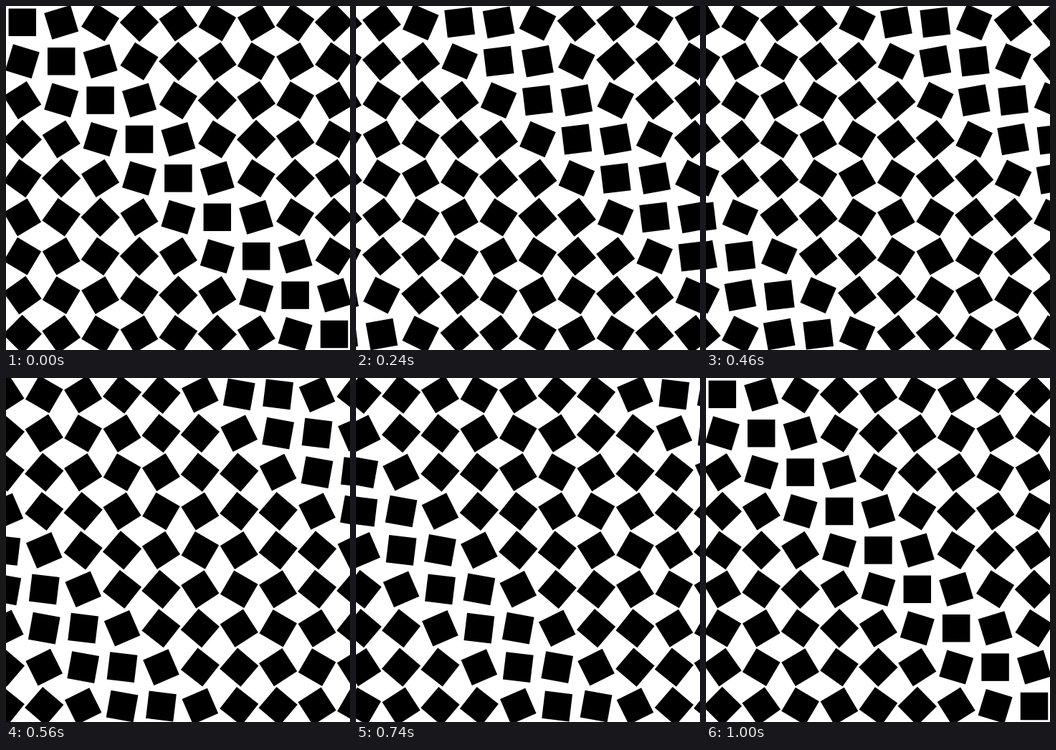
Write an HTML page with a canvas that moves like this. It is 480 px wide and 480 px high and loops after 1020 ms.

```html
<!DOCTYPE html>
<html lang="en">
<head>
<meta charset="utf-8">
<title>Turning squares</title>
<style>
  html, body { margin: 0; width: 100%; height: 100%; overflow: hidden; background: #fff; }
  canvas { display: block; width: 480px; height: 480px; }
</style>
</head>
<body>
<canvas id="stage" width="480" height="480"></canvas>
<script>
const ctx = document.getElementById("stage").getContext("2d");

const GAP = 54.4;              // distance between square centres
const SIDE = GAP / Math.SQRT2; // corners touch when turned by 45 degrees
const START = 22.8;
const ROWS = 9;
const SWING = Math.PI / 3;
const STEP_MS = 20;
const STEPS = 51;

// A sine wave runs across the diagonals; neighbours swing in opposite directions.
function tilt(diagonal, progress) {
  const direction = diagonal % 2 ? 1 : -1;
  return direction * SWING * Math.sin(Math.PI * (10 * progress - diagonal) / 11);
}

function drawSquare(x, y, angle) {
  ctx.save();
  ctx.translate(x, y);
  ctx.rotate(angle);
  ctx.fillRect(-SIDE / 2, -SIDE / 2, SIDE, SIDE);
  ctx.restore();
}

function draw(progress) {
  ctx.fillStyle = "#fff";
  ctx.fillRect(0, 0, 480, 480);
  ctx.fillStyle = "#000";
  for (let row = 0; row < ROWS; row++) {
    for (let col = -1; col < ROWS; col++) {
      drawSquare(START + GAP * (col + progress), START + GAP * row, tilt(col - row, progress));
    }
  }
}

const begin = performance.now();

function tick() {
  const elapsed = performance.now() - begin;
  const step = Math.floor(elapsed / STEP_MS) % STEPS;
  draw(step / (STEPS - 1));
  requestAnimationFrame(tick);
}

tick();
</script>
</body>
</html>
```
